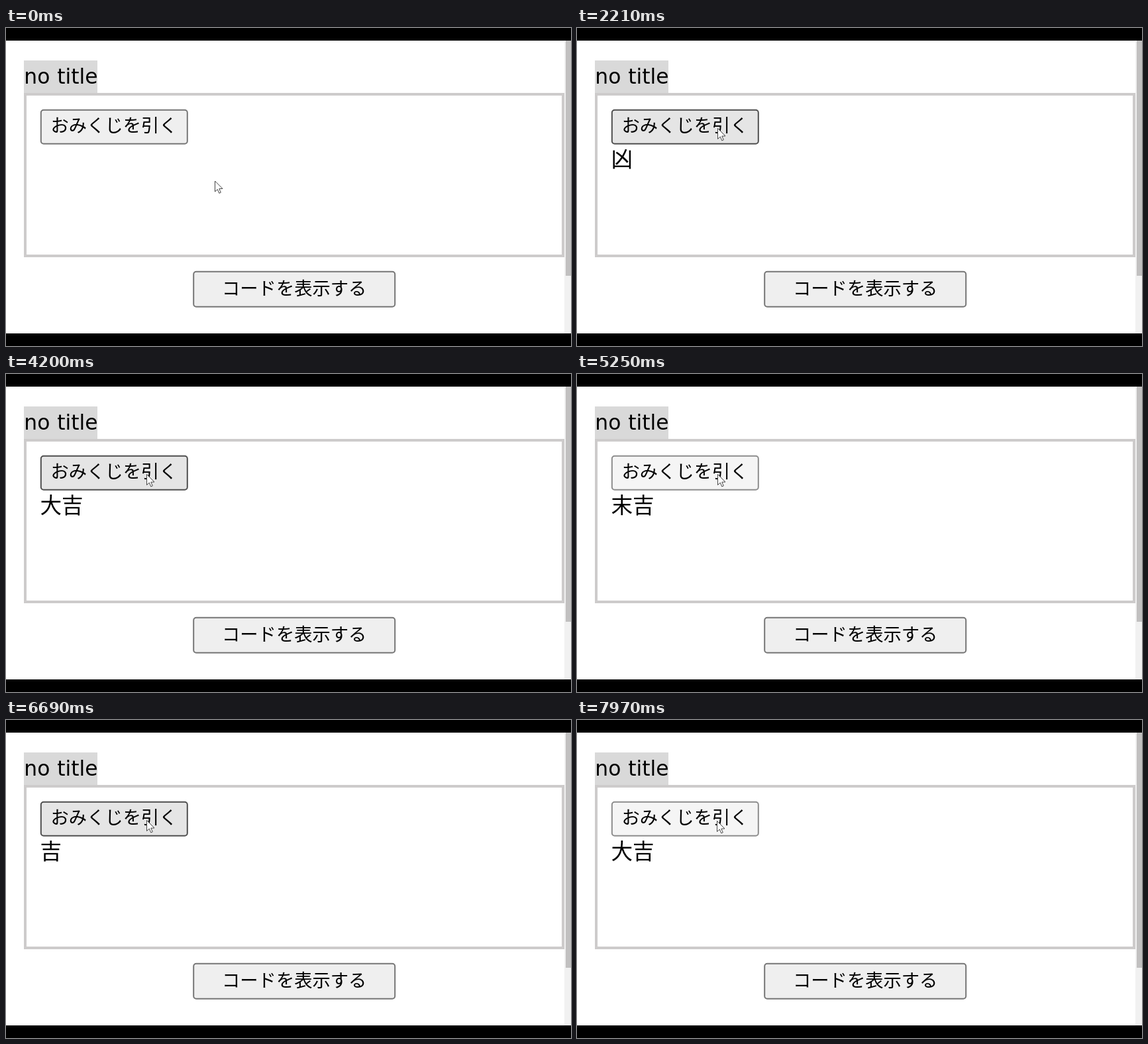
Write an HTML page that moves like this. It is 853x480 px and loops after 8000 ms.

```html
<!DOCTYPE html>
<html lang="ja">
<head>
<meta charset="utf-8">
<title>おみくじ</title>
<style>
  html, body { margin: 0; width: 100%; height: 100%; overflow: hidden; background: #000; }
  svg { display: block; width: 853px; height: 480px; }
  text { font-family: "Noto Sans CJK JP", "Noto Sans CJK", sans-serif; font-weight: 350; fill: #000; }
  .latin { font: 31.3px "DejaVu Sans", sans-serif; word-spacing: 1px; }
  .label { font-size: 27.3px; }
  .result { font-size: 32.6px; }
  .button { fill: #efefef; stroke: #767676; stroke-width: 2; }
  .button.hover { fill: #e5e5e5; stroke: #4f4f4f; }
  .button.active { fill: #f5f5f5; stroke: #8d8d8d; }
</style>
</head>
<body>
<svg viewBox="0 0 853 480">
  <rect width="853" height="480"/>
  <rect y="19" width="853" height="442" fill="#fff"/>
  <rect y="19" width="843" height="2" fill="#eee"/>
  <rect x="843" y="19" width="10" height="442" fill="#f1f1f1"/>
  <rect x="845" y="19" width="8" height="355" fill="#c1c0c0"/>

  <rect x="27" y="49" width="111" height="49" fill="#d9d9d9"/>
  <text class="latin" x="27.3" y="83.5">no title</text>
  <rect x="29" y="100" width="812" height="244" fill="#fff" stroke="#cdcbcb" stroke-width="4"/>

  <rect id="draw" class="button" x="52.8" y="123.7" width="221" height="51" rx="4"/>
  <text class="label" x="67.5" y="156.5">おみくじを引く</text>
  <text id="result" class="result" x="51.5" y="210"></text>

  <rect class="button" x="283.2" y="367.7" width="304" height="53" rx="4"/>
  <text class="label" x="326" y="402.5">コードを表示する</text>

  <path id="cursor" d="M0 0V16L3.8 12.6L6.3 18.4L8.8 17.3L6.3 11.7L11.5 11.5Z"
        fill="#fff" stroke="#444" stroke-width="1" stroke-linejoin="round"/>
</svg>
<script>
const LOOP = 8000;
const [draw, result, cursor] = ["draw", "result", "cursor"].map(id => document.getElementById(id));

// time, x, y of the pointer tip
const path = [
  [60, 315.5, 231], [160, 248, 167], [240, 212.5, 151.5],
  [7700, 212.5, 151.5], [7760, 211.5, 152.5]
];

// press time, release time, fortune shown on release
const clicks = [
  [570, 1020, "凶"], [1590, 2000, "凶"], [2540, 3120, "末吉"],
  [3360, 3960, "大吉"], [4460, 4880, "末吉"], [5130, 5580, "末吉"],
  [6000, 6570, "吉"], [6940, 7430, "大吉"], [7730, LOOP, ""]
];

function pointer(t) {
  const next = path.findIndex(p => p[0] > t);
  if (next === 0) return path[0].slice(1);
  if (next < 0) return path[path.length - 1].slice(1);
  const [t0, x0, y0] = path[next - 1];
  const [t1, x1, y1] = path[next];
  const k = (t - t0) / (t1 - t0);
  return [x0 + (x1 - x0) * k, y0 + (y1 - y0) * k];
}

function render(t) {
  const [x, y] = pointer(t);
  cursor.setAttribute("transform", `translate(${x} ${y})`);

  const over = x >= 52 && x < 275 && y >= 123 && y < 176;
  const pressed = clicks.some(([down, up]) => t >= down && t < up);
  draw.setAttribute("class", "button" + (pressed ? " active" : over ? " hover" : ""));

  const done = clicks.filter(([, up]) => t >= up);
  result.textContent = done.length ? done[done.length - 1][2] : "";
}

const start = performance.now();
function tick(now) {
  render(Math.max(0, now - start) % LOOP);
  requestAnimationFrame(tick);
}
render(0);
requestAnimationFrame(tick);
</script>
</body>
</html>
```
